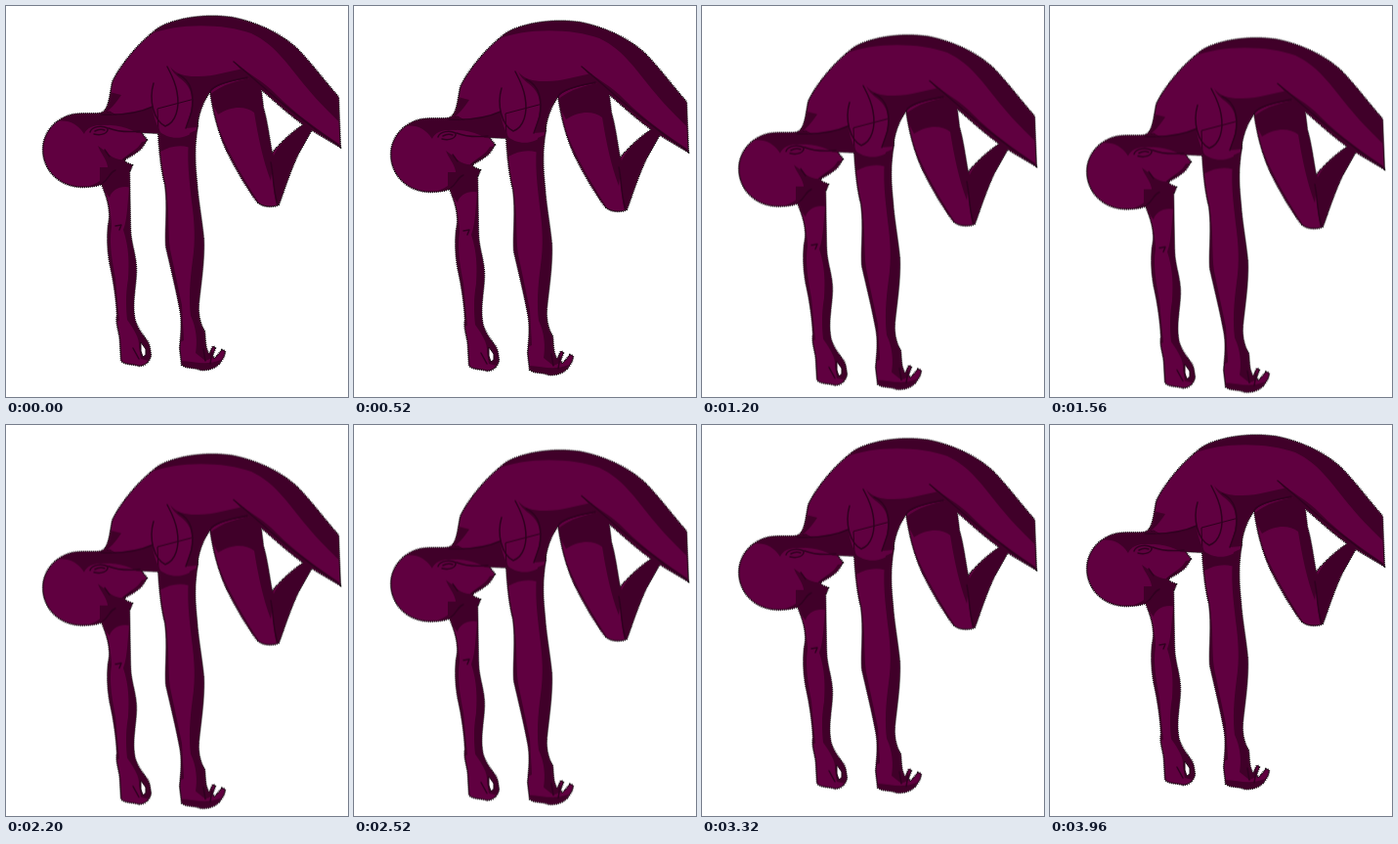
These frames come from a looping animation (350 px wide and 400 px high, 4 s). An HTML page:

```html
<!DOCTYPE html>
<html lang="en">
<head>
<meta charset="utf-8">
<title>Hanging figure</title>
<style>
  html, body { margin: 0; width: 100%; height: 100%; overflow: hidden; background: #fff; }
  svg { display: block; width: 350px; height: 400px; }
  .figure { animation: bob 4s ease-in-out infinite; }
  @keyframes bob {
    0%, 100% { transform: translateY(0); }
    40% { transform: translateY(22.5px); }
  }
  .edge { fill: none; stroke: #000; stroke-width: 2.4; stroke-dasharray: 1 1; }
  .skin { fill: #600040; stroke: #2c001c; stroke-width: 1; }
  .shade { fill: #400029; }
  .line { fill: none; stroke: #300020; stroke-width: 1.5; stroke-linecap: round; stroke-linejoin: round; }
  .gap { fill: #fff; stroke: #1c0012; stroke-width: 1; }
</style>
</head>
<body>
<svg viewBox="0 0 350 400">
  <defs>
    <path id="farArm" d="M97 170 L98 182 C102 192 107 205 106 218 C103 232 104 252 107 266
      C111 284 113 300 114 316 C112 326 117 334 117 346 L118 363 C122 367 130 366 136 368
      C142 368 147 364 148 357 C147 350 147 346 143 341 C137 333 132 326 131 317
      C129 304 132 290 133 274 C134 256 127 244 127 226 L126 166 Z"/>
    <path id="leg" d="M209 86 C212 108 217 128 226 148 C236 168 248 188 257 200
      C262 206 274 206 279 203 C284 190 290 170 299 151 L313 126 L307 120
      C294 128 282 139 272 151 C269 134 267 118 263 104 L260 80 L235 68 Z"/>
    <path id="torso" d="M97 110 C106 106 106 93 109 78 C117 61 135 38 157 22
      C176 12 205 8 232 12 C256 17 279 27 297 43 C311 57 325 76 340 93
      L342 144 C330 137 320 131 310 125 C292 113 276 98 260 84 L246 74
      C232 76 217 79 209 87 C202 97 197 108 195 125 L156 130 L136 129 L100 140 Z"/>
    <path id="head" d="M106 108 C94 112 82 109 69 111 C50 115 38 130 38 147
      C38 168 55 185 78 185 C87 185 95 184 101 180 C105 176 107 171 113 168
      L127 168 L129 163 L122 160 L121 157 L130 152 L138 146 L144 137 L138 129 L130 122 Z"/>
    <path id="nearArm" d="M155 105 C156 130 157 160 163 183 C166 205 163 226 164 246
      C169 268 174 288 178 309 C181 324 179 338 178 350 L180 367 C185 371 192 369 199 372
      C207 373 214 370 218 366 C221 362 224 358 224 353 L221 352 L217 357 L213 361
      L211 358 L214 350 L212 348 L208 357 C203 350 204 340 203 333 C199 326 196 317 197 304
      C199 284 203 260 202 238 C200 218 196 197 195 180 C193 160 192 145 196 122 L193 95 Z"/>
    <clipPath id="body">
      <use href="#farArm"/><use href="#leg"/><use href="#torso"/><use href="#head"/><use href="#nearArm"/>
    </clipPath>
    <g id="parts">
      <use href="#farArm"/><use href="#leg"/><use href="#torso"/><use href="#head"/><use href="#nearArm"/>
    </g>
  </defs>

  <g class="figure">
    <use href="#parts" class="edge"/>
    <use href="#parts" class="skin"/>

    <g class="shade" clip-path="url(#body)">
      <!-- back and flank -->
      <path d="M145 30 C175 17 222 18 251 28 C277 40 291 64 309 85 C321 100 333 110 344 122 V60 L290 0 H170 Z"/>
      <path d="M232 56 C248 70 263 76 277 91 C297 111 321 128 344 143 V150 L308 126 L260 87 Z"/>
      <path d="M168 62 C174 70 184 72 193 72 C211 73 226 67 243 64 L249 74 C224 77 211 82 207 89
        L196 124 L184 125 C190 109 193 92 186 82 C181 74 173 73 168 62 Z"/>
      <!-- neck and shoulder -->
      <path d="M106 88 L118 91 C112 100 107 106 98 112 Z"/>
      <path d="M90 112 C110 112 132 112 150 103 C151 114 154 121 159 131 L134 130 C120 121 105 122 92 121 Z"/>
      <!-- head -->
      <path d="M52 118 C66 107 90 108 109 109 L105 122 C91 121 83 124 80 131 C73 120 63 116 52 118 Z"/>
      <path d="M78 186 C93 183 104 176 104 164 C102 155 97 151 94 143 C102 148 106 155 116 157
        L128 158 V170 L108 172 L99 187 Z"/>
      <path d="M119 157 C126 150 134 148 139 139 L145 138 L137 149 L124 160 Z"/>
      <!-- far arm -->
      <path d="M96 165 H128 V186 C118 183 108 188 106 196 L96 184 Z"/>
      <path d="M127 180 C124 198 125 216 120 229 C126 247 126 263 125 279 C122 296 123 310 124 321
        C131 331 137 340 136 349 L138 361 L150 364 V340 L135 318 V180 Z"/>
      <path d="M98 182 C104 198 108 211 108 226 C105 243 109 263 112 279 L116 322 L110 323 L98 240 Z"/>
      <!-- near arm -->
      <path d="M155 127 C169 139 184 136 196 126 V149 C183 140 169 143 158 149 Z"/>
      <path d="M188 130 C184 155 188 180 190 200 C193 222 194 240 191 260 C188 282 187 300 189 317
        C195 329 196 344 194 355 L204 363 L211 360 L206 340 L204 250 L197 180 V126 Z"/>
      <path d="M156 140 L163 184 C168 207 165 229 168 249 L180 306 L182 342 L176 345 L160 240 Z"/>
      <path d="M179 363 C194 364 205 368 220 362 L212 375 H184 Z"/>
      <!-- leg -->
      <path d="M207 92 C222 79 239 76 250 74 L263 86 L274 154 L271 179 C263 158 258 134 254 109
        C244 101 229 103 217 111 Z"/>
      <path d="M308 118 C291 129 277 143 271 160 C274 174 273 188 277 205 L288 190 L316 127 Z"/>
      <path d="M211 104 C219 136 238 168 258 200 L251 201 L211 122 Z"/>
    </g>

    <g class="line">
      <path d="M151 79 C146 96 151 117 163 123 C174 119 178 104 175 88 C173 76 168 68 165 62"/>
      <path d="M176 70 C190 76 193 92 190 108 L184 125"/>
      <path d="M233 57 C260 79 292 111 341 143"/>
      <path d="M209 87 C215 79 234 76 247 73"/>
      <path d="M97 111 C117 112 137 109 150 103"/>
      <path d="M86 129 C88 123 98 122 104 125 C105 130 98 133 90 131 M91 128 Q96 125 101 127"/>
      <path d="M105 125 Q118 130 137 128 M101 147 L106 154 M120 157 L129 151"/>
      <path d="M99 181 C106 176 106 170 112 168 M112 225 L118 224 L116 229"/>
      <path d="M271 160 C274 174 273 187 278 203"/>
      <path d="M202 351 L204 363 M211 354 L209 366 M130 350 L136 361"/>
    </g>
    <path class="gap" d="M138 344 L143 351 L143 357 L140 359 L138 353 Z"/>
  </g>
</svg>
</body>
</html>
```
